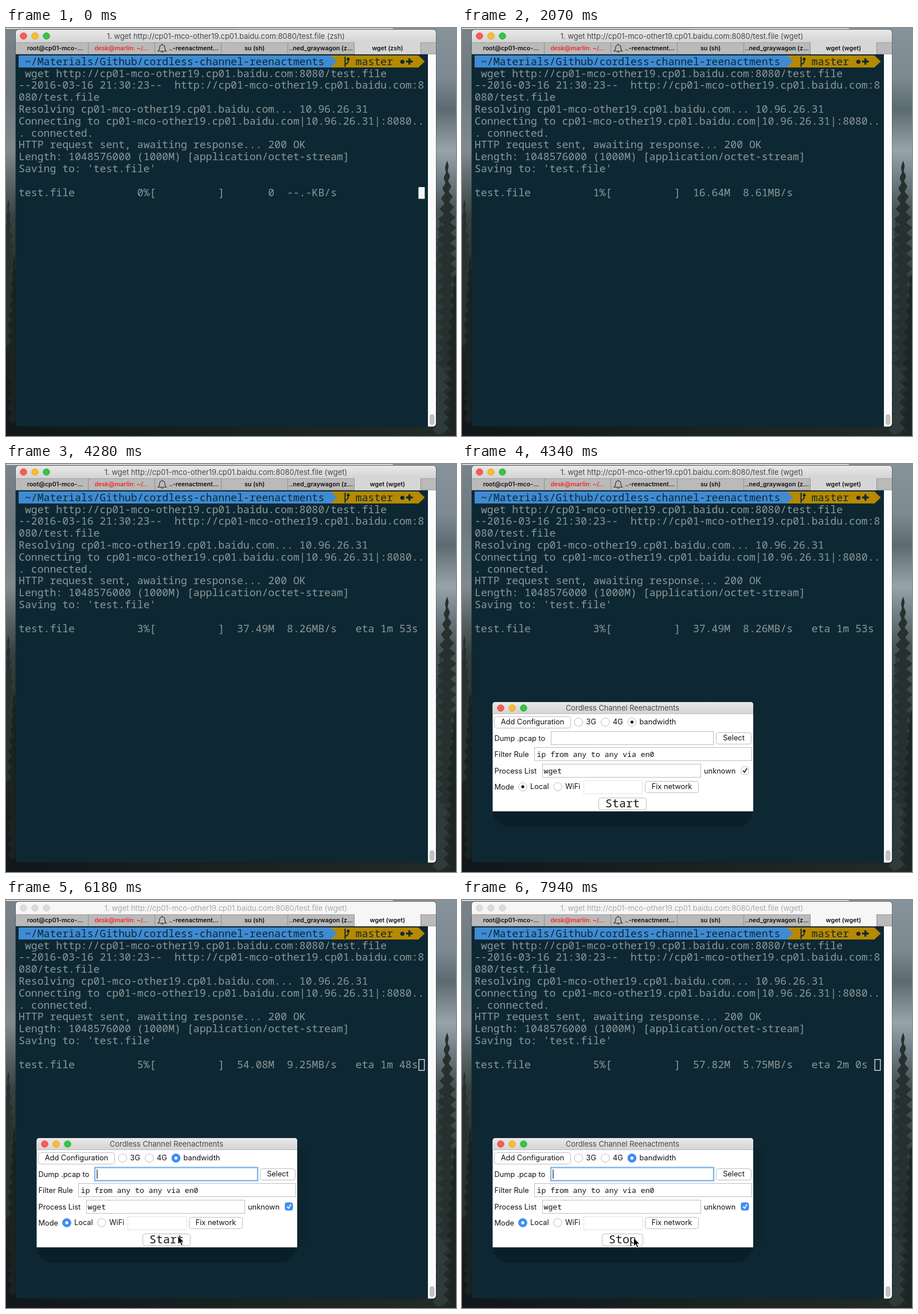
These frames come from a looping animation (785x713 px, 8 s). An HTML page:

```html
<!DOCTYPE html>
<html lang="en">
<head>
<meta charset="utf-8">
<title>Download</title>
<style>
  html, body { margin: 0; width: 100%; height: 100%; overflow: hidden; background: #141b1c; }
  svg { display: block; width: 785px; height: 713px; }
  text { white-space: pre; font: 12.8px Inter, sans-serif; fill: #111; }
  .mid { text-anchor: middle; }
  .term { font: 500 18.15px "Noto Sans Mono", monospace; fill: #8b9899; }
  .prompt { fill: #0e2833; }
  .entry { font: 13.15px "Noto Sans Mono", monospace; }
  .big { font: 20px "Noto Sans Mono", monospace; fill: #1a1a1a; }
  .tab { font: 600 10.6px Inter, sans-serif; text-anchor: middle; }
  .title { font-size: 12.9px; fill: #484848; text-anchor: middle; }
  .box { fill: #fff; stroke: #bdbdbd; }
  .off { stroke: #e4e4e4; }
  .ring { fill: none; stroke: #7db6ef; stroke-width: 2.4; display: none; }
  .dot { fill: #222; }
  .tick { fill: none; stroke: #222; stroke-width: 1.8; }
  .bar { fill: url(#bar); }
  .front { fill: #d6d6d6; }
  .wide { display: none; }
  .hollow { fill: none; stroke: #e9eeee; stroke-width: 1.3; display: none; }

  /* focus handed from the terminal to the dialog */
  .swap .bar, .swap .front { fill: #f6f6f6; }
  .swap .lights circle { fill: #dcdcdc; stroke: #cfcfcf; }
  .swap #title { fill: #a8a8a8; }
  .swap .ring, .swap .wide, .swap .hollow { display: inline; }
  .swap .on { fill: #3c8ff8; stroke: #2f7fe6; }
  .swap .dot { fill: #fff; }
  .swap .tick { stroke: #fff; }
</style>
</head>
<body>
<svg id="stage" viewBox="0 0 785 713">
  <defs>
    <linearGradient id="left" x2="0" y2="1">
      <stop stop-color="#78848a"/><stop offset=".15" stop-color="#6c797e"/>
      <stop offset=".3" stop-color="#7f8b8e"/><stop offset=".38" stop-color="#596466"/>
      <stop offset=".47" stop-color="#353f3f"/><stop offset=".65" stop-color="#262f2c"/>
      <stop offset=".85" stop-color="#171e1d"/><stop offset="1" stop-color="#11171a"/>
    </linearGradient>
    <linearGradient id="right" x2="0" y2="1">
      <stop stop-color="#87939a"/><stop offset=".12" stop-color="#7d8a92"/>
      <stop offset=".2" stop-color="#5c6a71"/><stop offset=".3" stop-color="#98a4aa"/>
      <stop offset=".36" stop-color="#76838a"/><stop offset=".45" stop-color="#485354"/>
      <stop offset=".65" stop-color="#343f3c"/><stop offset="1" stop-color="#1f2724"/>
    </linearGradient>
    <linearGradient id="floor">
      <stop stop-color="#11171a"/><stop offset="1" stop-color="#232b28"/>
    </linearGradient>
    <linearGradient id="bar" x2="0" y2="1">
      <stop stop-color="#e9e9e9"/><stop offset="1" stop-color="#d3d3d3"/>
    </linearGradient>
    <clipPath id="frame"><rect x="17" y="3" width="733" height="693.5" rx="5"/></clipPath>
  </defs>

  <g id="wall">
    <rect width="400" height="713" fill="url(#left)"/>
    <rect x="400" width="385" height="713" fill="url(#right)"/>
    <rect y="690" width="785" height="23" fill="url(#floor)"/>
    <rect width="675" height="1.5" fill="#eee"/>
  </g>

  <rect x="16.5" y="2.5" width="734" height="694.5" rx="5.5" fill="none" stroke="#000" stroke-opacity=".25"/>
  <g clip-path="url(#frame)">
    <rect x="17" y="3" width="733" height="694" fill="#0e2833"/>
    <rect class="bar" x="17" y="3" width="733" height="22"/>
    <rect x="17" y="25" width="733" height="21" fill="#bababa"/>
    <path d="M17 25.5H607M723 25.5H750M17 45.5H750" stroke="#a0a0a0"/>
    <rect class="front" x="607" y="24" width="116" height="22"/>
    <path d="M143.5 25V46M259.5 25V46M375.5 25V46M491.5 25V46M607.5 25V46M723.5 25V46" stroke="#8e8e8e"/>
    <rect x="736" y="46" width="14" height="651" fill="#fbfbfb"/>
    <rect x="739" y="675" width="8.5" height="18.5" rx="4.2" fill="#c1c1c1"/>
  </g>
  <g id="tabs"></g>
  <path d="M265.5 40.5C268 38.5 267.5 36 268 33.5C268.5 30.5 270 29.5 272.5 29.5S276.5 30.5 277 33.5C277.5 36 277 38.5 279.5 40.5ZM270.5 41.5Q272.5 44 274.5 41.5M272.5 27.5V29.5" fill="none" stroke="#333" stroke-width="1.2"/>
  <text id="title" class="title" x="383.5" y="18.7"></text>

  <path d="M566 48H719.5L730.5 58.5L719.5 69H566Z" fill="#b58900"/>
  <path d="M22 48H566.5L577.5 58.5L566.5 69H22Z" fill="#3f8bd3"/>
  <path d="M591.5 50V68M591.5 63.5Q597 62 597 57.5V53M594.5 55.5L597 52.5L599.5 55.5" fill="none" stroke="#0e2833" stroke-width="2"/>
  <circle cx="691.5" cy="59" r="3.6" fill="#0e2833"/>
  <path d="M698 58.5H709.5M703.7 53V64" stroke="#0e2833" stroke-width="3.4"/>
  <g id="rows"></g>
  <text id="progress" class="term" x="22"></text>
  <rect id="block" x="719.5" y="278" width="11" height="20.5" fill="#f4f6f6"/>
  <rect class="hollow" x="720.2" y="278.7" width="9.6" height="19"/>

  <g id="dialog">
    <rect class="wide" x="480" y="430" width="45" height="176" rx="18" fill="#0c2530"/>
    <rect x="53.5" y="560" width="454.5" height="74" rx="30" fill="#0a2029"/>
    <path d="M53.5 607V421Q53.5 416 58.5 416H503Q508 416 508 421V607Z" fill="#fff"/>
    <path d="M53.5 437V421Q53.5 416 58.5 416H503Q508 416 508 421V437Z" fill="url(#bar)"/>
    <path d="M53.5 436.5H508" stroke="#bcbcbc"/>
    <text class="title" x="280" y="431.3">Cordless Channel Reenactments</text>
    <g id="controls"></g>
    <rect class="ring" x="155" y="467.5" width="284" height="23"/>
    <rect class="box on" x="487" y="529" width="13" height="13" rx="3"/>
    <path class="tick" d="M490 535.5L492.8 538.8L497.2 531.8"/>
    <rect id="go" class="box" y="583.5" height="20.5" rx="4"/>
    <text id="goText" class="big mid" x="280" y="600"></text>
    <path id="caret" d="M159 471V487" stroke="#111" stroke-width="1.2"/>
  </g>

  <path id="arrow" d="M0 0V14.5L3.5 11.3L6 17L8.3 16L5.9 10.5H10.3Z" fill="#000" stroke="#fff" stroke-width=".9"/>
  <path id="beam" d="M-3.5 -8Q0 -8 0 -5.5Q0 -8 3.5 -8M0 -6V6M-3.5 8Q0 8 0 5.5Q0 8 3.5 8M-2 2.5H2" fill="none" stroke="#111" stroke-width="1.2"/>
</svg>
<script>
const LOOP = 8000;
const $ = id => document.getElementById(id);

function add(parent, tag, attrs, text = '') {
  const el = document.createElementNS('http://www.w3.org/2000/svg', tag);
  for (const key in attrs) el.setAttribute(key, attrs[key]);
  el.textContent = text;
  parent.append(el);
  return el;
}
const show = (el, on) => el.setAttribute('visibility', on ? 'visible' : 'hidden');

// Wallpaper trees
function tree(x, top, bottom, half, fill) {
  const side = [];
  for (let y = top, i = 0; y < bottom; y += 9, i++) {
    const reach = half * Math.min(1, (y - top) / 130 + 0.12);
    side.push([i % 2 ? reach : reach * 0.35, y]);
  }
  const right = side.map(([w, y]) => `${x + w} ${y}`);
  const left = side.map(([w, y]) => `${x - w} ${y + 3}`).reverse();
  add($('wall'), 'path', { d: `M${right.join('L')}L${left.join('L')}Z`, fill });
}
tree(758, 330, 713, 14, '#2f3b3a');
tree(769, 232, 600, 17, '#26312f');
tree(783, 430, 713, 15, '#1d2624');
tree(4, 300, 560, 12, '#27312f');
tree(14, 400, 690, 11, '#1a2321');

function lights(x, y, group) {
  const g = add($('stage'), 'g', { class: group });
  [['#fb5b55', '#e0443e'], ['#fcbb2f', '#dea123'], ['#34c748', '#27aa35']].forEach(([fill, stroke], i) =>
    add(g, 'circle', { cx: x + i * 20, cy: y, r: 5.7, fill, stroke }));
  return g;
}
lights(30.5, 14, 'lights');
$('dialog').append(lights(67.5, 426.5, 'keep'));

// Terminal
[['root@cp01-mco-...', 85.5], ['desk@marlin: ~/...', 201.5, '#f02a22'], ['..-reenactment...', 327.5],
 ['su (sh)', 433.5], ['..ned_graywagon (z...', 549.5]].forEach(([name, x, fill = '#111']) =>
  add($('tabs'), 'text', { class: 'tab', x, y: 39, style: `fill:${fill}` }, name));
const liveTab = add($('tabs'), 'text', { class: 'tab', x: 665.5, y: 38.5 });

const HOST = 'cp01-mco-other19.cp01.baidu.com';
const URL_TEXT = `http://${HOST}:8080/test.file`;
const rowY = i => 64.7 + i * 20.82;
[` ~/Materials/Github/cordless-channel-reenactments${' '.repeat(5)}master`,
 ` wget ${URL_TEXT}`,
 `--2016-03-16 21:30:23--  http://${HOST}:8`,
 '080/test.file',
 `Resolving ${HOST}... 10.96.26.31`,
 `Connecting to ${HOST}|10.96.26.31|:8080..`,
 '. connected.',
 'HTTP request sent, awaiting response... 200 OK',
 'Length: 1048576000 (1000M) [application/octet-stream]',
 "Saving to: 'test.file'"].forEach((line, i) =>
  add($('rows'), 'text', { class: i ? 'term' : 'term prompt', x: 22, y: rowY(i) }, line));
$('progress').setAttribute('y', rowY(11));

// Dialog
const ui = $('controls');
const label = (x, y, text, cls = '') => add(ui, 'text', { x, y, class: cls }, text);
const rect = (x, y, width, height, cls = 'box', rx = 0) =>
  add(ui, 'rect', { x: x + .5, y: y + .5, width, height, rx, class: cls });
function button(x, y, width, text) {
  rect(x, y, width, 20, 'box', 4);
  label(x + width / 2 + .5, y + 14.3, text, 'mid');
}
function radio(x, y, text, on) {
  add(ui, 'circle', { cx: x, cy: y, r: 7.3, class: on ? 'box on' : 'box' });
  if (on) add(ui, 'circle', { cx: x, cy: y, r: 2.7, class: 'dot' });
  label(x + 13, y + 4.3, text);
}
button(56, 441, 133, 'Add Configuration');
radio(203.5, 451, '3G');
radio(250, 451, '4G');
radio(296.5, 451, 'bandwidth', true);
label(56.5, 484, 'Dump .pcap to');
rect(155, 467, 283, 23);
button(443, 469, 61, 'Select');
label(56.5, 512, 'Filter Rule');
rect(126, 495, 379, 23);
label(130.5, 512.3, 'ip from any to any via en0', 'entry');
label(56.5, 540.5, 'Process List');
rect(140, 524, 276, 23);
label(142.5, 541, 'wget', 'entry');
label(422, 540.5, 'unknown');
label(56.5, 568.7, 'Mode');
radio(106, 564, 'Local', true);
radio(167, 564, 'WiFi');
rect(212, 553, 102, 23, 'box off');
button(319, 554, 93, 'Fix network');

// Time, then values; linear in between
function between(keys, t) {
  const i = keys.findIndex(k => k[0] > t);
  if (i < 0) return keys[keys.length - 1].slice(1);
  const a = keys[Math.max(0, i - 1)], b = keys[i];
  const f = Math.max(0, (t - a[0]) / (b[0] - a[0]));
  return a.slice(1).map((v, j) => v + (b[j + 1] - v) * f);
}
const last = (list, t) => list.filter(([at]) => at <= t).pop();

// The download reports about every 200 ms, with two stalls
const TICKS = [180, 360, 570, 750, 960, 1170, 1350, 1890, 2100, 2310, 2490, 2700, 2910,
  3090, 3330, 3510, 3690, 3900, 4100, 4280, 4520, 4700, 4900, 5110, 5340, 5530, 5740, 5950,
  6180, 6650, 6830, 7040, 7250, 7450, 7650, 7830, 7940].map(t => [t]);
// ms, megabytes, MB/s
const RATE = [[180, 2.31, 10.4], [960, 10.83, 10.6], [1350, 14.52, 10.6], [1890, 16.64, 8.61],
  [3090, 26.29, 8.34], [4280, 37.49, 8.26], [5110, 45.09, 7.99], [6180, 54.08, 9.25],
  [6650, 56.97, 8.04], [7250, 57.41, 6.71], [7940, 57.82, 5.75]];
// Refreshed once a second
const ETA = [[3090, '1m 57s'], [4100, '1m 53s'], [5110, '1m 49s'], [6180, '1m 48s'], [7250, '2m 0s']];
const POINTER = [[4580, 500, 713], [4900, 420, 575], [5110, 390, 542], [5340, 372, 553],
  [5800, 301, 587], [5950, 300, 587], [6650, 300, 587], [6830, 299.5, 590.5]];
const BLINK = [[0, 1], [570, 0], [1170, 1], [1890, 0], [2490, 1], [3090, 0], [3690, 1], [4280, 0]];
const TITLE_AT = 1050, OPEN_AT = 4340, FOCUS_AT = 4400, STOP_AT = 6650;

function progressLine(t) {
  const tick = last(TICKS, t);
  if (!tick) return barLine(0, '0', '--.-KB/s');
  const [mb, rate] = between(RATE, tick[0]);
  const eta = last(ETA, t);
  return barLine(Math.floor(mb / 10), mb.toFixed(2) + 'M',
    rate.toFixed(rate < 10 ? 2 : 1) + 'MB/s', eta ? `   eta ${eta[1]}` : '');
}
function barLine(pct, size, speed, eta = '') {
  return 'test.file'.padEnd(19) + `${pct}%[${' '.repeat(10)}]${size.padStart(8)}  ${speed}${eta}`;
}

const within = (v, a, b) => v >= a && v < b;

function draw(t) {
  const shell = t < TITLE_AT ? '(zsh)' : '(wget)';
  $('title').textContent = `1. wget ${URL_TEXT} ${shell}`;
  liveTab.textContent = `wget ${shell}`;
  $('progress').textContent = progressLine(t);
  show($('block'), last(BLINK, t)[1]);

  const focused = t >= FOCUS_AT;
  $('stage').classList.toggle('swap', focused);
  $('dialog').style.display = t >= OPEN_AT ? '' : 'none';
  show($('caret'), focused && (t - 650) % 900 < 600);

  const stop = t >= STOP_AT;
  $('goText').textContent = stop ? 'Stop' : 'Start';
  $('go').setAttribute('x', stop ? 244.5 : 238.5);
  $('go').setAttribute('width', stop ? 71 : 83);

  const [x, y] = between(POINTER, t);
  const moving = t >= POINTER[0][0];
  const typing = within(x, 126, 505) && within(y, 495, 519) || within(x, 140, 417) && within(y, 524, 548);
  show($('beam'), moving && typing);
  show($('arrow'), moving && !typing);
  for (const id of ['beam', 'arrow']) $(id).setAttribute('transform', `translate(${x} ${y})`);
}

const start = performance.now();
function loop() {
  draw((performance.now() - start) % LOOP);
  requestAnimationFrame(loop);
}
loop();
</script>
</body>
</html>
```
